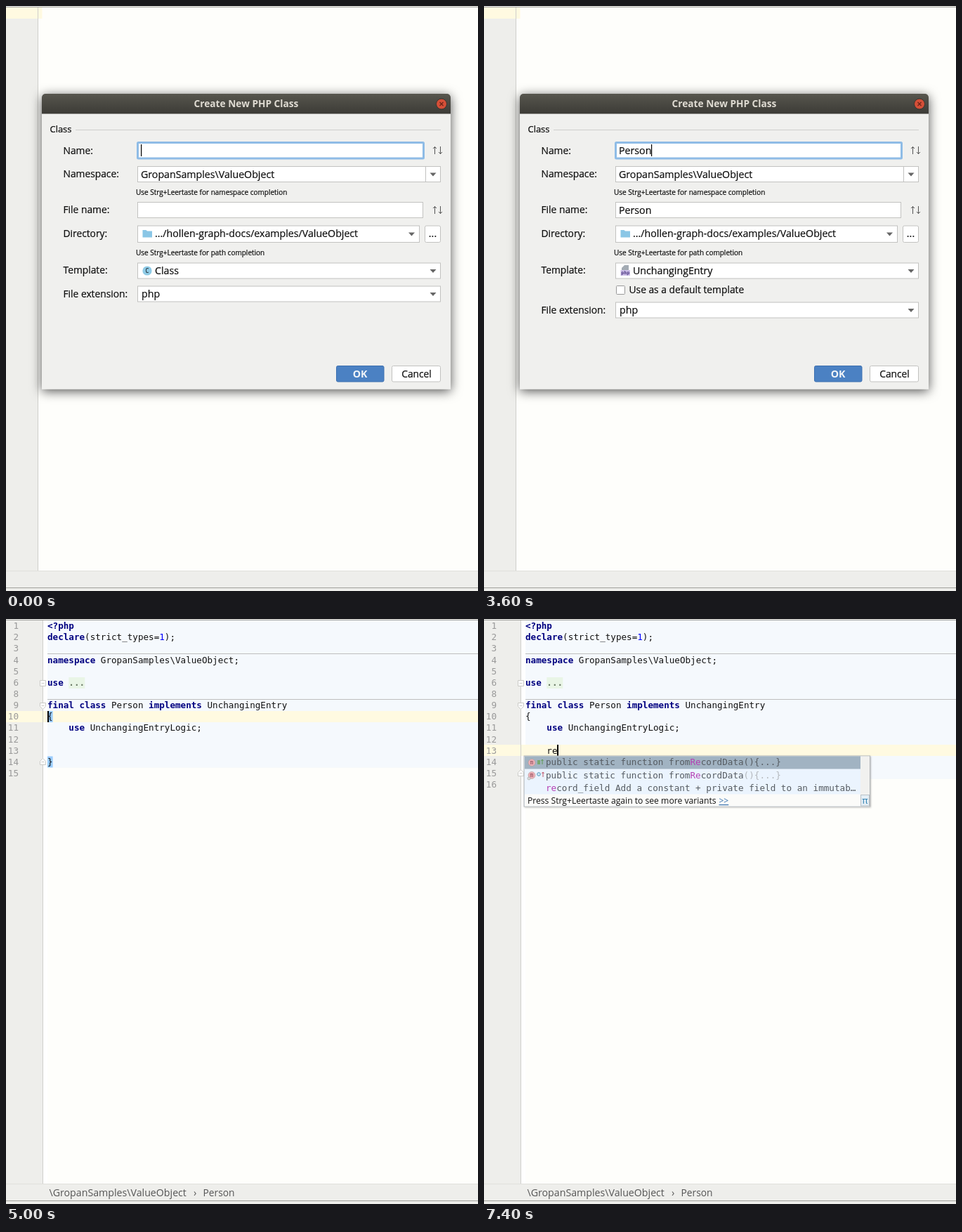
An HTML page for the animation above (8000 ms loop, 672 px wide and 833 px high).

```html
<!DOCTYPE html>
<html lang="en">
<head>
<meta charset="utf-8">
<title>New class dialog</title>
<style>
html, body { margin: 0; width: 100%; height: 100%; overflow: hidden; background: #fefefb; }
svg { display: block; width: 672px; height: 833px; }
text { white-space: pre; }
.ui { font: 14.2px "Open Sans", "Noto Sans", sans-serif; fill: #111; }
#dialog text { stroke: currentColor; stroke-width: .2; }
#dialog .light { stroke: none; }
.label { font-size: 13.8px; }
.hint { font-size: 10px; }
.mono { font: 12.6px "DejaVu Sans Mono", monospace; fill: #111; }
.num { fill: #999; text-anchor: end; }
.key { font-weight: bold; fill: #000080; }
.int { fill: #0000ff; }
.dots { font-weight: bold; fill: #6b7a66; }
.hit { fill: #b43fb4; }
.pale { fill: #b3b7bb; }
.pick { font-size: 12.65px; fill: #555b61; }
.field { fill: #fff; stroke: #c2c2c0; }
.fold { fill: #fff; stroke: #cacac6; }
.badge { font: 8px "DejaVu Sans Mono", monospace; text-anchor: middle; fill: #345; }
.arrow { fill: none; stroke: #555; }
#dialog { transform-origin: 342px 336px; }
</style>
</head>
<body>
<svg viewBox="0 0 672 833">
  <defs>
    <linearGradient id="bar" x1="0" y1="0" x2="0" y2="1">
      <stop offset="0" stop-color="#57564e"/><stop offset="1" stop-color="#3c3b36"/>
    </linearGradient>
    <filter id="shade" x="-10%" y="-10%" width="120%" height="125%">
      <feDropShadow dx="0" dy="3" stdDeviation="8" flood-opacity=".68"/>
    </filter>
    <filter id="soft" x="-5%" y="-10%" width="110%" height="130%">
      <feDropShadow dx="1" dy="1" stdDeviation="1" flood-opacity=".25"/>
    </filter>
    <path id="drop" d="M-4.5 -2.5h9L0 2.5z" fill="#666"/>
    <path id="swap" class="arrow" d="M0 11V0.5M-2.5 3L0 .5L2.5 3M8 0V10.5M5.5 8L8 10.5L10.5 8"/>
  </defs>

  <rect width="672" height="833" fill="#fefefb"/>
  <rect id="gutter" y="2" height="803" fill="#eeeeeb"/>

  <g id="editor">
    <rect x="53" y="2" width="6" height="803" fill="#fff"/>
    <rect id="block" x="59" y="2" width="613" fill="#f5f9fd"/>
    <rect id="line" width="672" height="16" fill="#fffae1"/>
    <g id="seps" fill="#bebebe">
      <rect x="59" y="49" width="613" height="1"/>
      <rect x="59" y="114" width="613" height="1"/>
    </g>
    <rect x="89.3" y="83" width="23" height="16" fill="#e9f5e6"/>
    <path d="M52.5 2V805" stroke="#cfcfcb"/>
    <path class="fold" d="M48.5 87.5h8v8h-8zM50.5 91.5h4"/>
    <path class="fold" d="M48.5 119.5h8v5l-4 4l-4-4zM50.5 123.5h4"/>
    <g id="braces" fill="#99ccff">
      <rect x="59" y="131" width="7.6" height="16"/>
      <rect x="59" y="195.5" width="7.6" height="16"/>
    </g>
    <g id="code"></g>
    <g id="tail">
      <path class="fold" d="M48.5 207.5v-5l4-4l4 4v5zM50.5 203.5h4"/>
      <text class="mono" x="59" y="207.6">}</text>
    </g>
    <text id="typed" class="mono" x="89.3" y="191.6"></text>
    <rect id="cursor" width="2" height="16" fill="#000"/>
  </g>
  <g id="blank">
    <rect y="2" width="51.5" height="16" fill="#fffae1"/>
    <path d="M45.5 2V805" stroke="#cfcfcb"/>
  </g>

  <rect y="804" width="672" height="29" fill="#eeeeeb"/>
  <path d="M0 804.5H672" stroke="#e0e0dc"/>
  <path d="M0 828.5H672M0 1.5H672" stroke="#a0a09c"/>
  <rect width="672" height="1" fill="#eeeeeb"/>
  <g id="crumbs" class="ui" style="fill:#555">
    <text x="61.5" y="822">\GropanSamples\ValueObject</text>
    <text x="267" y="822">›</text>
    <text class="label" x="280.5" y="822">Person</text>
  </g>

  <g id="popup">
    <rect x="57" y="195" width="492.5" height="72" fill="#ebf4fe" stroke="#b0b4b6" filter="url(#soft)"/>
    <rect x="58" y="195.5" width="478" height="18" fill="#a1b3c2"/>
    <rect x="536" y="195.5" width="13" height="54.5" fill="#f1f1ef"/>
    <rect x="58" y="249.5" width="491" height="17" fill="#fbfbf9"/>
    <g stroke="#a98" stroke-width=".5" fill="#eeb0b8">
      <circle cx="68" cy="204.5" r="5"/><circle cx="68" cy="222.5" r="5"/>
    </g>
    <g class="badge" style="fill:#8a4a55">
      <text x="68" y="207">m</text><text x="68" y="225">m</text>
    </g>
    <path d="M76 201h4v6h-4z" fill="#79a86f"/>
    <path d="M83 207v-7M81.5 202l1.5-2l1.5 2" fill="none" stroke="#5f9a55"/>
    <circle cx="78" cy="221" r="2.3" fill="#d9eef8" stroke="#4a94b8"/>
    <path d="M84 225v-7M82.5 220l1.5-2l1.5 2" fill="none" stroke="#c0566a"/>
    <circle cx="64" cy="227" r="2" fill="#ddd" stroke="#999" stroke-width=".6"/>
    <g class="mono pick">
      <text x="88" y="208.3">public static function from<tspan class="hit">Re</tspan>cordData(){...}</text>
      <text x="88" y="226.5">public static function from<tspan class="hit">Re</tspan>cordData<tspan class="pale">(){...}</tspan></text>
      <text x="88" y="244.5"><tspan class="hit">re</tspan>cord_field Add a constant + private field to an immutab…</text>
    </g>
    <text class="ui" style="font-size:12.15px" x="62" y="263">Press Strg+Leertaste again to see more variants</text>
    <text class="ui" style="font-size:12px;fill:#3b73af;text-decoration:underline" x="334.5" y="263">&gt;&gt;</text>
    <rect x="536.5" y="250.5" width="12" height="15.5" fill="#e4eef5" stroke="#b8c0c6"/>
    <text class="ui" style="font-size:13px;fill:#2c7fb0;text-anchor:middle" x="542.5" y="263">π</text>
  </g>

  <g id="dialog" class="ui">
    <path d="M51 545.5V130a5 5 0 0 1 5-5H628a5 5 0 0 1 5 5V545.5z" fill="#f0f0ee" filter="url(#shade)"/>
    <path d="M51 153.5V130a5 5 0 0 1 5-5H628a5 5 0 0 1 5 5V153.5z" fill="url(#bar)"/>
    <text class="light" x="342" y="144" style="font-size:13.7px;font-weight:bold;fill:#dfdbd2;text-anchor:middle">Create New PHP Class</text>
    <circle cx="620" cy="139.5" r="7.5" fill="#d54f38" stroke="#35342f"/>
    <path d="M617.5 137l5 5M622.5 137l-5 5" stroke="#6b2417" stroke-width="1.3"/>

    <text style="font-size:12.9px" x="62.5" y="180">Class</text>
    <path d="M99 176.5H619" stroke="#cfcfcd"/>
    <g class="label">
      <text x="81.5" y="211">Name:</text>
      <text x="81.5" y="244">Namespace:</text>
      <text x="81.5" y="295">File name:</text>
      <text x="81.5" y="329">Directory:</text>
      <text x="81.5" y="381">Template:</text>
    </g>
    <g class="hint">
      <text x="185" y="268.5">Use Strg+Leertaste for namespace completion</text>
      <text x="185" y="354.5">Use Strg+Leertaste for path completion</text>
    </g>

    <rect x="187.5" y="194.5" width="407" height="22.5" rx="1" fill="#fff" stroke="#8fbce6" stroke-width="3"/>
    <text id="name" x="192" y="211"></text>
    <rect id="caret" y="197" width="1.2" height="17" fill="#000"/>
    <use href="#swap" x="610.5" y="200"/>
    <rect class="field" x="187.5" y="228.5" width="431" height="22"/>
    <path d="M597.5 229V250" stroke="#c2c2c0"/>
    <use href="#drop" x="608" y="240"/>
    <text x="192" y="245">GropanSamples\ValueObject</text>
    <rect class="field" x="187.5" y="279.5" width="406" height="22"/>
    <text id="file" x="192" y="296"></text>
    <use href="#swap" x="610.5" y="285"/>
    <rect class="field" x="187.5" y="313" width="401" height="23.5"/>
    <path d="M194.5 319h5l1.5 1.5h7v9h-13.5z" fill="#8ac6e6"/>
    <text x="212" y="329">.../hollen-graph-docs/examples/ValueObject</text>
    <use href="#drop" x="577.5" y="325"/>
    <rect class="field" x="596.5" y="313" width="22" height="23.5" rx="2"/>
    <text x="607.5" y="329" text-anchor="middle">...</text>

    <rect class="field" x="187.5" y="366" width="431" height="22"/>
    <use href="#drop" x="608" y="377.5"/>
    <circle id="disc" cx="201" cy="377" r="6.6"/>
    <text id="letter" class="badge" x="201" y="380"></text>
    <g id="sheet">
      <path d="M200 369h6v7h-10v-3z" fill="#a3abb3"/>
      <rect x="194.5" y="376" width="13.5" height="8" fill="#cdbfe8"/>
      <text class="badge light" style="font-size:6.5px;font-weight:bold;fill:#4b3580" x="201.2" y="382">php</text>
    </g>
    <text id="kind" x="212" y="382"></text>

    <g id="check">
      <rect x="188.5" y="398.5" width="12" height="12" rx="1" fill="#fff" stroke="#999"/>
      <text class="label" x="206.5" y="409">Use as a default template</text>
    </g>
    <g id="ext">
      <text class="label" x="81.5" y="414.5">File extension:</text>
      <rect class="field" x="187.5" y="399" width="431" height="22"/>
      <text x="193" y="415">php</text>
      <use href="#drop" x="608" y="410.5"/>
    </g>

    <rect x="470.5" y="512.5" width="67.5" height="22.5" rx="2" fill="#4b81c3" stroke="#3d70b0"/>
    <text class="light" x="504" y="528.5" style="font-weight:bold;fill:#f2f5f9;text-anchor:middle">OK</text>
    <rect class="field" x="549.5" y="512.5" width="69" height="22.5" rx="2"/>
    <text class="label" x="584.5" y="528.5" text-anchor="middle">Cancel</text>
  </g>
</svg>

<script>
const LOOP = 8000, ROW = 16.13, COL = 7.585;
const $ = id => document.getElementById(id);
const show = (id, on) => { $(id).style.display = on ? '' : 'none'; };
const set = (id, attrs) => { for (const k in attrs) $(id).setAttribute(k, attrs[k]); };
const rowTop = i => 2 + ROW * i;
const within = (t, from, to) => t >= from && t < to;

// Value of the last [time, value] step reached
const at = (steps, t) => steps.reduce((v, s) => t >= s[0] ? s[1] : v, undefined);

const names = [[0, ''], [800, 'P'], [1000, 'Pe'], [1100, 'Per'], [1900, 'Perso'], [2100, 'Person']];
const kinds = [[0, 'Class'], [2800, 'Interface'], [3100, 'Trait'], [3600, 'UnchangingEntry']];
const discs = { Class: '#8fcbe6', Interface: '#9ad08c', Trait: '#9ad08c' };
const rows = [[0, 8], [5800, 9], [5900, 10], [6900, 11]];
const cols = [[0, 0], [6200, 4], [7300, 5], [7400, 6]];
const typing = [[0, ''], [7300, 'r'], [7400, 're']];

// *word* is a keyword, #n# a number, ~...~ a folded region
const source = [
  '*<?php*', '*declare*(strict_types=#1#);', '', '*namespace* GropanSamples\\ValueObject;', '',
  '*use* ~...~', '', '*final class* Person *implements* UnchangingEntry', '{',
  '    *use* UnchangingEntryLogic;'
];
const paint = s => s.replace(/</g, '&lt;')
  .replace(/\*(.+?)\*/g, '<tspan class="key">$1</tspan>')
  .replace(/#(.+?)#/g, '<tspan class="int">$1</tspan>')
  .replace(/~(.+?)~/g, '<tspan class="dots">$1</tspan>');

let markup = '';
for (let i = 0; i < 15; i++) {
  const y = rowTop(i) + 12.2, n = i < 6 ? i + 1 : i + 2;
  markup += `<text class="mono num" id="n${n}" x="18" y="${y}">${n}</text>`;
  if (source[i]) markup += `<text class="mono" x="59" y="${y}">${paint(source[i])}</text>`;
}
$('code').innerHTML = markup;

function drawDialog(t) {
  const name = at(names, t), kind = at(kinds, t), record = t >= 3600;
  $('name').textContent = $('file').textContent = name;
  set('caret', { x: 192 + Math.round(name ? $('name').getComputedTextLength() : 0) });
  show('caret', !within(t, 500, 600) && !within(t, 3200, 3600) && !within(t, 4500, 4600));
  $('kind').textContent = kind;
  $('letter').textContent = record ? '' : kind[0];
  set('disc', { fill: discs[kind] || 'none' });
  show('sheet', record);
  show('check', record);
  set('ext', { transform: `translate(0 ${record ? 23 : 0})` });
  $('dialog').style.transform = t >= 4700 ? 'scaleY(.395)' : 'none';
}

function drawEditor(t) {
  const row = at(rows, t), extra = t >= 6900 ? ROW : 0, top = Math.round(rowTop(row));
  set('block', { height: ROW * 13 + extra });
  set('line', { y: top });
  set('cursor', { x: 59 + Math.floor(COL * at(cols, t)), y: top });
  set('tail', { transform: `translate(0 ${extra})` });
  $('typed').textContent = at(typing, t);
  show('n16', extra);
  show('seps', t >= 5000);
  show('braces', t < 5800);
  show('cursor', !within(t, 6800, 6900));
}

function frame() {
  const t = performance.now() % LOOP, open = t < 4800;
  show('dialog', open);
  show('blank', open);
  show('editor', !open);
  show('crumbs', !open);
  show('popup', t >= 7400);
  set('gutter', { width: open ? 45 : 52 });
  open ? drawDialog(t) : drawEditor(t);
  requestAnimationFrame(frame);
}
frame();
</script>
</body>
</html>
```
